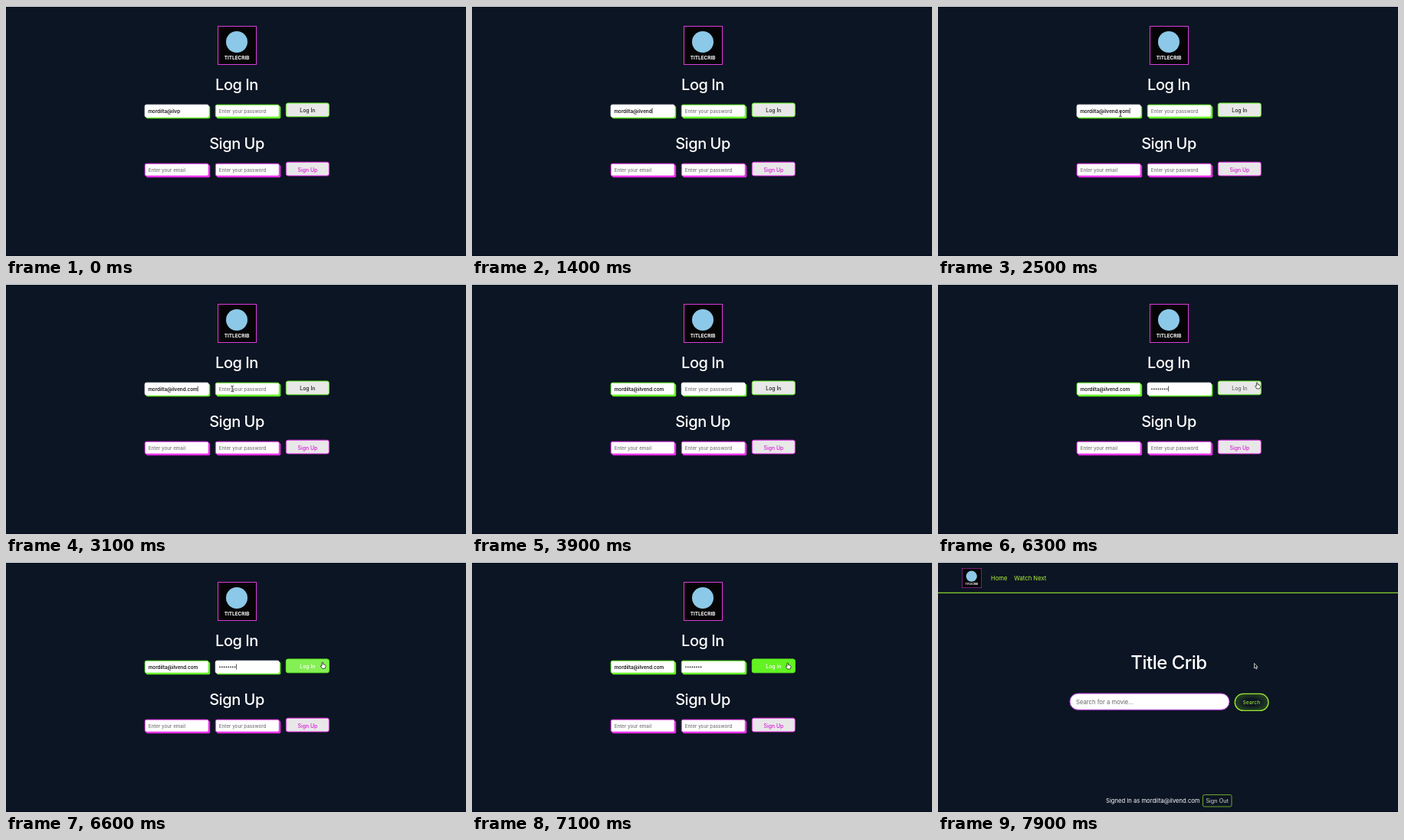
Recreate the animation shown at these times as an HTML page. Size 600 by 327 pixels, loop 8000 ms.

```html
<!DOCTYPE html>
<html lang="en">
<head>
<meta charset="utf-8">
<style>
  html, body { margin: 0; width: 100%; height: 100%; overflow: hidden; background: #0c1523; }
  svg { display: block; width: 600px; height: 327px; font-family: Inter, "Open Sans", sans-serif; }
  h1, .title { font-size: 20px; font-weight: 500; letter-spacing: -.45px; fill: #fff; }
  .mid { text-anchor: middle; }
  .hint { font-size: 6.25px; font-weight: 500; fill: #777; }
  .typed { font-size: 6.35px; font-weight: 600; letter-spacing: -.05px; fill: #1a1a1a; }
  .label { font-size: 6.9px; font-weight: 500; }
  .nav { font-size: 7.7px; fill: #b4f53c; }
  .caret { stroke: #222; stroke-width: .8; }
</style>
</head>
<body>
<svg viewBox="0 0 600 327">
  <defs>
    <g id="logo">
      <rect x=".5" y=".5" width="50" height="50" fill="#050507" stroke="#dc3cdc"/>
      <circle cx="25" cy="21" r="14" fill="#8cc8e8"/>
      <text class="mid" x="25.2" y="43.5" font-size="6.4" font-weight="700" fill="#fff">TITLECRIB</text>
    </g>
    <radialGradient id="glow">
      <stop offset=".4" stop-color="#0c1523"/>
      <stop offset="1" stop-color="#24401f"/>
    </radialGradient>
  </defs>
  <rect width="600" height="327" fill="#0c1523"/>
  <rect width="600" height="1" fill="#e6e9ec"/>
  <rect y="326" width="600" height="1" fill="#070b20"/>

  <g id="login">
    <use href="#logo" x="276" y="26"/>
    <text class="title mid" x="301" y="109.5">Log In</text>
    <text class="title mid" x="301" y="186.5">Sign Up</text>
    <g id="forms"></g>
    <text id="email" class="typed" x="185.2" y="139.5"></text>
    <line id="emailCaret" class="caret" y1="133.5" y2="140.5"/>
    <path id="dots" fill="none" stroke="#1a1a1a" stroke-width="1.7" stroke-linecap="round" stroke-dasharray="0 2.8"/>
    <line id="passCaret" class="caret" y1="133.5" y2="140.5"/>
  </g>

  <g id="home">
    <use href="#logo" transform="translate(31 8) scale(.51)"/>
    <text class="nav" x="69" y="23.7">Home</text>
    <text class="nav" x="99.3" y="23.7">Watch Next</text>
    <rect y="39.7" width="600" height="1.3" fill="#86cc2c"/>
    <text class="mid" x="301" y="140" font-size="24" font-weight="500" letter-spacing="-.5" fill="#fff">Title Crib</text>
    <rect x="171" y="171" width="210" height="23.5" rx="11.7" fill="#2c1546"/>
    <rect x="172" y="172" width="208" height="21.3" rx="10.6" fill="#fff" stroke="#a83cc8"/>
    <text x="180" y="185.6" font-size="7.7" fill="#666">Search for a movie...</text>
    <rect x="387.2" y="172.4" width="43.8" height="22" rx="11" fill="url(#glow)" stroke="#9be834" stroke-width="1.3"/>
    <text class="mid" x="409" y="185.7" font-size="6.3" font-weight="500" letter-spacing=".2" fill="#9be834">Search</text>
    <text x="219" y="314.8" font-size="7.65" fill="#fff">Signed In as mordilta@ilvend.com</text>
    <rect x="345.5" y="304.5" width="37.5" height="15.5" rx="2" fill="none" stroke="#6da52c"/>
    <text class="mid" x="364.2" y="314.8" font-size="7.3" fill="#d5dccb">Sign Out</text>
  </g>

  <g id="mouse">
    <path id="beam" d="M-1.8-3.7Q0-3.7 0-2.5Q0-3.7 1.8-3.7M0-2.5V2.5M-1.8 3.7Q0 3.7 0 2.5Q0 3.7 1.8 3.7" fill="none" stroke="#222" stroke-width=".9"/>
    <path id="arrow" d="M0-3.5V3L1.5 1.7L2.6 4L3.7 3.5L2.6 1.3H4.5Z" fill="#111" stroke="#fff" stroke-width=".7"/>
    <path id="hand" d="M-1.6-3.8Q-.8-4.5 0-3.7V-1.4Q3.4-1.2 3.4.4V1.9L2.5 4H-1.2L-3.4.7Q-3-.5-1.6.6Z" fill="#fff" stroke="#222" stroke-width=".8"/>
  </g>
</svg>
<script>
const LOOP = 8000, GREEN = '#62f321', PINK = '#ec2cec', PITCH = 2.8;
const $ = id => document.getElementById(id);
const set = (id, attrs) => { for (const k in attrs) $(id).setAttribute(k, attrs[k]); };
const show = (id, on) => set(id, { display: on ? 'inline' : 'none' });

const field = (id, x, y, color, hint) => `
  <rect x="${x + 2}" y="${y + 2}" width="83.5" height="16.5" rx="2" fill="${color}"/>
  <rect id="${id}" x="${x + .5}" y="${y + .5}" width="83" height="16" rx="2" fill="#fff" stroke="${color}"/>
  <text id="${id}Hint" class="hint" x="${x + 5}" y="${y + 10.8}">${hint}</text>`;
const button = (id, y, color, ink, label) => `
  <rect id="${id}" x="365.3" y="${y}" width="56" height="17.8" rx="2.5" fill="#e8e8e8" stroke="${color}"/>
  <text id="${id}Label" class="label mid" x="393.4" y="${y + 12.3}" fill="${ink}">${label}</text>`;

$('forms').innerHTML =
  field('user', 180.7, 128.7, GREEN, '') +
  field('pass', 272.8, 128.7, GREEN, 'Enter your password') +
  button('enter', 127, GREEN, '#222', 'Log In') +
  field('newUser', 180.7, 205.7, PINK, 'Enter your email') +
  field('newPass', 272.8, 205.7, PINK, 'Enter your password') +
  button('join', 204.2, PINK, '#d61fd6', 'Sign Up');

// [time, value] steps
const typing = [[0, 'ilvp'], [100, 'ilv'], [800, 'ilve'], [1000, 'ilven'], [1400, 'ilvend'],
  [1600, 'ilvend.'], [1800, 'ilvend.c'], [2000, 'ilvend.co'], [2100, 'ilvend.com']];
const dotCount = [[0, 0], [4000, 1], [4400, 3], [4900, 4], [5500, 6], [5600, 7], [5900, 8]];
// [time, x, y] of the pointer
const path = [[2500, 238, 141], [2800, 270, 147], [3000, 295, 137], [5900, 298, 138],
  [6000, 330, 139], [6300, 417, 133], [6700, 412.5, 136], [8000, 412.5, 136]];

const stepAt = (steps, t) => steps.filter(s => s[0] <= t).pop()[1];
const within = (t, a, b) => t >= a && t < b;
const ramp = (t, a, b) => Math.min(1, Math.max(0, (t - a) / (b - a)));
const mix = (from, to, k) => `rgb(${from.map((v, i) => Math.round(v + (to[i] - v) * k))})`;

function pointer(t) {
  const i = Math.max(1, path.findIndex(p => p[0] > t));
  const [a, b] = [path[i - 1], path[i]], k = ramp(t, a[0], b[0]);
  return [a[1] + (b[1] - a[1]) * k, a[2] + (b[2] - a[2]) * k];
}

function draw(t) {
  const home = t >= 7900;
  show('login', !home);
  show('home', home);

  const inUser = t < 3200, inPass = within(t, 3200, 6800);
  set('user', { stroke: inUser ? '#fff' : GREEN });
  set('pass', { stroke: inPass ? '#fff' : GREEN });

  $('email').textContent = 'mordilta@' + stepAt(typing, t);
  set('email', { x: inUser ? 185.2 : 185.7 });
  const end = 185.7 + (home ? 0 : $('email').getComputedTextLength());
  set('emailCaret', { x1: end, x2: end });
  show('emailCaret', inUser && t >= 200 && !within(t, 500, 800) && !within(t, 2600, 3100));

  const n = stepAt(dotCount, t), passEnd = 278.2 + n * PITCH;
  show('passHint', !n);
  show('dots', n);
  set('dots', { d: `M279 137.3h${Math.max(0, n - 1) * PITCH + .1}` });
  set('passCaret', { x1: passEnd, x2: passEnd });
  show('passCaret', within(t, 3200, 7000) && !within(t, 3700, 4000));

  set('enter', { fill: mix([232, 232, 232], [98, 243, 33], ramp(t, 6300, 6700)) });
  set('enterLabel', { fill: mix([34, 34, 34], [255, 255, 255], ramp(t, 6200, 6500)) });

  const [x, y] = pointer(t);
  const onButton = !home && x > 365, onField = x < 264 || within(x, 273, 357);
  show('mouse', within(t, 2500, 3900) || t >= 5900);
  set('mouse', { transform: `translate(${x} ${y})` });
  show('hand', onButton);
  show('beam', onField);
  show('arrow', !onButton && !onField);
}

const start = performance.now();
(function tick() {
  const t = (performance.now() - start) % LOOP;
  draw(Math.floor(t / 100) * 100);
  requestAnimationFrame(tick);
})();
</script>
</body>
</html>
```
